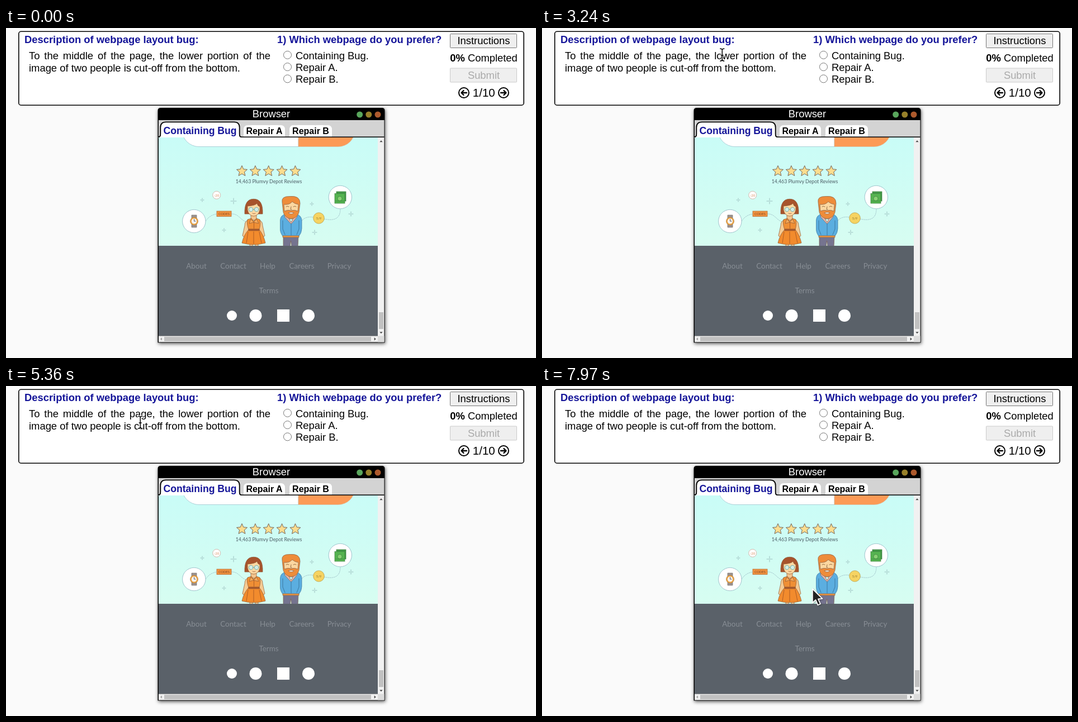
Animation, 948 px wide and 591 px high, one loop 8000 ms. Source, as an HTML page:

```html
<!DOCTYPE html>
<html lang="en">
<head>
<meta charset="utf-8">
<title>Webpage layout survey</title>
<style>
  html, body { margin: 0; width: 100%; height: 100%; overflow: hidden; background: #fafafa; }
  svg { display: block; width: 948px; height: 591px; }
  svg, p { font: 18.4px "Liberation Sans", Arial, sans-serif; }
  p { margin: 0; text-align: justify; color: #000; }
  .bold { font-weight: bold; }
  .navy { fill: #151599; }
  .mid { text-anchor: middle; }
  .lato { font-family: Lato, sans-serif; text-anchor: middle; }
  .tiny { font: 6px Lato, sans-serif; text-anchor: middle; }
  .line { fill: none; stroke-linecap: round; stroke-linejoin: round; }
  #window { filter: drop-shadow(1px 2px 3px rgba(0,0,0,.65)); }
  #arrow { filter: drop-shadow(1px 1px 1px rgba(0,0,0,.35)); }
</style>
</head>
<body>
<svg viewBox="0 0 948 591" xmlns="http://www.w3.org/2000/svg">
  <defs>
    <linearGradient id="sky" x2="0" y2="1">
      <stop stop-color="#c9fcf7"/><stop offset="1" stop-color="#d7fdf1"/>
    </linearGradient>
    <clipPath id="page"><rect x="273" y="196" width="392" height="194"/></clipPath>
  </defs>

  <!-- Question panel -->
  <rect x="22.8" y="6.3" width="903.4" height="131.9" rx="4" fill="#fff" stroke="#000" stroke-width="1.6"/>
  <text class="bold navy" x="33" y="27">Description of webpage layout bug:</text>
  <foreignObject x="41" y="38.5" width="432" height="60">
    <p xmlns="http://www.w3.org/1999/xhtml">To the middle of the page, the lower portion of the image of two people is cut-off from the bottom.</p>
  </foreignObject>
  <text class="bold navy" x="485" y="27">1) Which webpage do you prefer?</text>
  <g id="options"></g>
  <rect x="794.5" y="10.5" width="119" height="25" rx="1" fill="#efefef" stroke="#767676"/>
  <text class="mid" x="854.5" y="29">Instructions</text>
  <text class="mid" x="854.5" y="60"><tspan class="bold">0%</tspan> Completed</text>
  <rect x="794.5" y="72" width="119" height="25" rx="1" fill="#efefef" stroke="#cbcbcb"/>
  <text class="mid" x="854.5" y="91" fill="#aaa">Submit</text>
  <text class="mid" x="854.8" y="123" font-size="20.5">1/10</text>
  <g class="line" stroke="#000" stroke-width="2">
    <circle cx="819" cy="116" r="9"/><circle cx="890" cy="116" r="9"/>
    <path stroke-width="2.4" d="M824 116H815M818.500 112L814.500 116L818.500 120M885 116H894M890.500 112L894.500 116L890.500 120"/>
  </g>

  <!-- Browser window -->
  <path id="window" d="M271.500 563.500V148Q271.500 143 276.500 143H672.500Q677.500 143 677.500 148V563.500Z"/>
  <rect x="273" y="165" width="403.500" height="31" fill="#d3d3d3"/>
  <text class="mid" x="474.500" y="160" fill="#fff">Browser</text>
  <circle cx="632.7" cy="155" r="5.5" fill="#59a65c"/>
  <circle cx="648.8" cy="155" r="5.5" fill="#97802a"/>
  <circle cx="665" cy="155" r="5.5" fill="#ad5a2d"/>
  <g fill="#fff">
    <path d="M425 195V182Q425 174 433 174H491Q499 174 499 182V195ZM507 195V182Q507 174 515 174H575Q583 174 583 182V195Z"/>
    <path d="M272 195.300H676.500" stroke="#000" stroke-width="1.6"/>
    <path d="M272 196.500V195.300Q276.300 195 276.300 190V178Q276.300 168.300 286 168.300H408Q417.700 168.300 417.700 178V190Q417.700 195.300 421 195.300V196.500Z"/>
    <path class="line" stroke="#000" stroke-width="1.8" d="M272.500 195.300Q276.300 195 276.300 190V178Q276.300 168.300 286 168.300H408Q417.700 168.300 417.700 178V190Q417.700 195.300 421 195.300"/>
  </g>
  <text class="bold navy mid" x="347" y="190" font-size="17.6">Containing Bug</text>
  <text class="bold mid" x="462" y="190" font-size="16">Repair A</text>
  <text class="bold mid" x="545" y="190" font-size="16">Repair B</text>

  <!-- Page inside the window -->
  <g clip-path="url(#page)">
    <rect x="273" y="196" width="392" height="194" fill="url(#sky)"/>
    <path d="M523 212.500H345A30 30 0 0 1 345 152H523Z" fill="#fff" stroke="#a5cbd4" stroke-width=".9"/>
    <path d="M523 212.500H594A30 30 0 0 0 594 152H523Z" fill="#fc9a56" stroke="#d8b79c" stroke-width=".6"/>
    <g id="stars" fill="#fbdd8f" stroke="#75675a" stroke-linejoin="round"></g>
    <text class="lato" x="470" y="278" font-size="8.8" fill="#4b5c64">14,463 Plumvy Depot Reviews</text>
    <path class="line" stroke="#9bbcc4" stroke-width=".8" stroke-dasharray="2 1.5" d="M357 346Q364 335 377 333M403 333C416 332 420 345 430 347M526 349Q534 336 550 339M569 342C584 345 598 344 598 324"/>
    <g id="sparkles" class="line" stroke="#8fb0b3" stroke-width=".8"></g>

    <g fill="#fff" stroke="#8fb6c2" stroke-width=".8">
      <circle cx="336.300" cy="346" r="20.700"/><circle cx="597.800" cy="303" r="20.700"/>
      <circle cx="376.700" cy="299.300" r="7" stroke="#c9a99b"/>
    </g>
    <path d="M332 335H341V357H332Z" fill="#9c928f" stroke="#77706e" stroke-width=".7"/>
    <circle cx="336.500" cy="346" r="7" fill="#f0a746" stroke="#a9793d" stroke-width=".7"/>
    <circle cx="336.500" cy="346" r="4.700" fill="#f4f3f5"/>
    <path class="line" stroke="#565a68" d="M336.500 342.500V346H339"/>
    <text class="tiny" x="376.700" y="301.500" fill="#d98b5d">-20</text>
    <rect x="377" y="328" width="26" height="9.500" fill="#f19340" stroke="#b7692f" stroke-width=".8"/>
    <text class="tiny" x="390" y="335" fill="#81451f">CODES</text>
    <circle cx="559.500" cy="340.500" r="9.800" fill="#f6d362" stroke="#b89d49" stroke-width=".8"/>
    <text class="tiny" x="559.500" y="342.700" fill="#94782e">5/9</text>
    <g stroke="#397f3c" stroke-width=".7">
      <rect x="591" y="293" width="17" height="17" fill="#439948"/>
      <rect x="588" y="296.500" width="18" height="17.500" fill="#55b350"/>
      <circle cx="597" cy="305.500" r="4" fill="#89d175"/>
      <path d="M589 310H605" fill="none"/>
    </g>

    <!-- Woman -->
    <g stroke="#8b5731" stroke-width=".7" stroke-linejoin="round">
      <path d="M427 333Q426 306 443 306.300Q460 306 459 333Z" fill="#a7532c"/>
      <path d="M438 331H448V344H438Z" fill="#f3c48d"/>
      <path d="M432 319Q446 318 449 314Q450 319 454 320V326Q452 336 443 337Q434 336 432 326Z" fill="#fbd8a2"/>
      <path d="M434 344Q427 345 427 354L423 372L431 379L435 358ZM452 344Q459 345 459 354L463 372L455 379L451 358Z" fill="#f6cb93"/>
      <path d="M436 382H441V392H436ZM446 382H451V392H446Z" fill="#f6cb93"/>
      <path d="M432 343L439 341L443 346L448 341L454 343Q456 350 453 361H434Q430 350 432 343Z" fill="#ef8f35"/>
      <path d="M434 361H453Q461 371 464 385Q443 391 422 385Q425 371 434 361Z" fill="#f28b2d"/>
      <path d="M434 360H453V363H434Z" fill="#a9572b"/>
      <path d="M438 342L443 348L435 350ZM448 342L443 348L452 350Z" fill="#f5a95a"/>
    </g>
    <g class="line" stroke="#68aaa7" stroke-width=".9">
      <circle cx="438" cy="325" r="3.700" fill="#d3eee8"/><circle cx="448" cy="325" r="3.700" fill="#d3eee8"/>
      <path d="M441.500 325H444.500"/><path stroke="#a96036" d="M441 332Q443 333.500 446 332"/>
      <path stroke="#a85925" d="M443.500 348V359M433 365L430 385M443 365V386M453 365L457 385"/>
    </g>

    <!-- Man -->
    <g stroke="#80614b" stroke-width=".7" stroke-linejoin="round">
      <path d="M496 373H523L522 392H511L509.500 381L508 392H496Z" fill="#75748f"/>
      <path d="M503 329H516V342H503Z" fill="#f3c48d"/>
      <path d="M501 333Q491 335 490.500 344V359Q490 367 496 374H523Q529 367 529 359V344Q528 335 518 333L510 349Z" fill="#5baee0" stroke="#38749b"/>
      <path d="M501 333L510 348L518 333L521 338L510 351L498 338Z" fill="#e8b7ae"/>
      <path d="M495 372H524V375H495Z" fill="#ed963f"/>
      <path d="M494 312Q492 301 508 301.500Q526 300 526 314L524 330Q521 341 510 341.500Q499 341 496 330Z" fill="#ee8c3a"/>
      <path d="M497 316Q507 317 512 311Q516 315 523 316L522 328Q516 325 510 327Q504 325 498 328Z" fill="#fcd7a0"/>
      <path d="M505 331Q510 329 515 331Q510 335 505 331Z" fill="#fff4e5"/>
    </g>
    <g class="line" stroke="#8a633d" stroke-width=".9">
      <path d="M501 320Q503 318 506 320M514 320Q517 318 519 320M510 320L509 325H511"/>
      <path stroke="#38749b" d="M495 345V360L499 370M524 345V360L520 370M510 350V371"/>
    </g>
  </g>

  <!-- Footer -->
  <rect x="273" y="390" width="392" height="161.500" fill="#5a6169"/>
  <g id="links" font-size="13.4" fill="#888e95"></g>
  <g fill="#fff">
    <circle cx="404" cy="515" r="9"/><circle cx="446.500" cy="515" r="11"/>
    <rect x="485" y="504" width="22" height="22"/><circle cx="541" cy="515" r="11"/>
  </g>

  <!-- Scrollbars -->
  <path d="M665 196H676.500V562.500H273V551.500H665Z" fill="#f1f1f1"/>
  <path d="M667 509H675V539H667ZM283 553H653V561H283Z" fill="#c1c1c1"/>
  <rect x="665" y="551.500" width="11.500" height="11" fill="#dcdcdc"/>
  <path d="M668.300 204.300L671 201.300L673.700 204.300ZM668.300 544.300L671 547.300L673.700 544.300ZM658.700 554.300L661.700 557L658.700 559.700Z" fill="#484848"/>
  <path d="M279 554.300L276 557L279 559.700Z" fill="#a3a3a3"/>

  <!-- Pointers, hot spot at 0,0 -->
  <g id="beam" class="line" visibility="hidden"></g>
  <path id="arrow" visibility="hidden" d="M.8 1.300V26.500L6.500 21L10.500 30.300L15 28.300L11 19.500L18.500 18.800Z" fill="#222" stroke="#fff" stroke-width="1.8" stroke-linejoin="round"/>
</svg>
<script>
const el = id => document.getElementById(id);
const fill = (id, items, draw) => { el(id).innerHTML = items.map(draw).join(''); };

fill('options', ['Containing Bug.', 'Repair A.', 'Repair B.'], (label, i) =>
  `<circle cx="503.5" cy="${48.3 + 21.3 * i}" r="7" fill="#fff" stroke="#767676"/>
   <text x="518" y="${55.7 + 21.3 * i}">${label}</text>`);

const star = Array.from({ length: 10 }, (_, i) => {
  const r = i % 2 ? 4.6 : 10, a = i * Math.PI / 5;
  return [r * Math.sin(a), -r * Math.cos(a)];
}).join(' ');
fill('stars', [0, 1, 2, 3, 4], i => `<polygon points="${star}" transform="translate(${422 + 23.85 * i} 256.500)"/>`);

fill('sparkles', [[351, 308, 3], [407, 310, 5], [390, 362, 3], [547, 315, 3], [617, 333, 4], [552, 366, 4]],
  ([x, y, r]) => `<path d="M${x - r} ${y}h${r - 1}m2 0h${r - 1}M${x} ${y - r}v${r - 1}m0 2v${r - 1}"/>`);

fill('links', [['About', 340.5], ['Contact', 406.5], ['Help', 468], ['Careers', 529], ['Privacy', 596], ['Terms', 470, 475]],
  ([label, x, y = 431]) => `<text class="lato" x="${x}" y="${y}">${label}</text>`);

const beamShape = 'M-3.5 -11Q-.5 -11 0 -9Q.5 -11 3.500 -11M0 -9V9M-3.5 11Q-.5 11 0 9Q.5 11 3.500 11M-2 1H2';
fill('beam', [['#fff', 3.4], ['#000', 1.5]], ([color, width]) =>
  `<path d="${beamShape}" stroke="${color}" stroke-width="${width}"/>`);

// Pointer path: [time in ms, x, y]
const LOOP = 8000, SHOW = 550, TEXT_BOTTOM = 84;
const path = [
  [550, 73, 79], [900, 52, 60], [1130, 46, 53], [1350, 50, 55], [1530, 50, 55],
  [2310, 136, 48], [2400, 136.5, 48], [3200, 312, 48], [3720, 439, 47.5], [3900, 432, 79],
  [4040, 395, 77], [4080, 364, 70.5], [4440, 44, 70], [4880, 151, 77], [5360, 240, 65],
  [5720, 346, 63.5], [6100, 440, 300], [6410, 517, 396], [6530, 480, 432], [6700, 342, 385],
  [6800, 400, 323], [6920, 571, 360], [7050, 455, 418], [7180, 380, 395], [7370, 470, 340],
  [7430, 500, 331], [7570, 545, 375], [7680, 490, 424], [7800, 416, 390], [7970, 483, 362],
];

const slope = (i, k) => (path[i + 1][k] - path[i][k]) / (path[i + 1][0] - path[i][0]);
function tangent(i, k) {
  if (i === 0 || i === path.length - 1) return 0;
  const a = slope(i - 1, k), b = slope(i, k);
  return a * b > 0 ? 2 * a * b / (a + b) : 0;
}

// Hermite curve that never overshoots its points
function at(t, k) {
  const next = path.findIndex(p => p[0] > t);
  if (next < 0) return path[path.length - 1][k];
  const i = next - 1, span = path[next][0] - path[i][0], u = (t - path[i][0]) / span, v = 1 - u;
  return v * v * (1 + 2 * u) * path[i][k] + u * u * (3 - 2 * u) * path[next][k]
    + span * u * v * (v * tangent(i, k) - u * tangent(next, k));
}

function place(id, visible, x, y) {
  el(id).setAttribute('visibility', visible ? 'visible' : 'hidden');
  el(id).setAttribute('transform', `translate(${x} ${y})`);
}

function draw() {
  const t = performance.now() % LOOP, shown = t >= SHOW;
  const x = shown ? at(t, 1) : 0, y = shown ? at(t, 2) : 0;
  place('beam', shown && y <= TEXT_BOTTOM, x, y);
  place('arrow', shown && y > TEXT_BOTTOM, x, y);
  requestAnimationFrame(draw);
}
draw();
</script>
</body>
</html>
```
